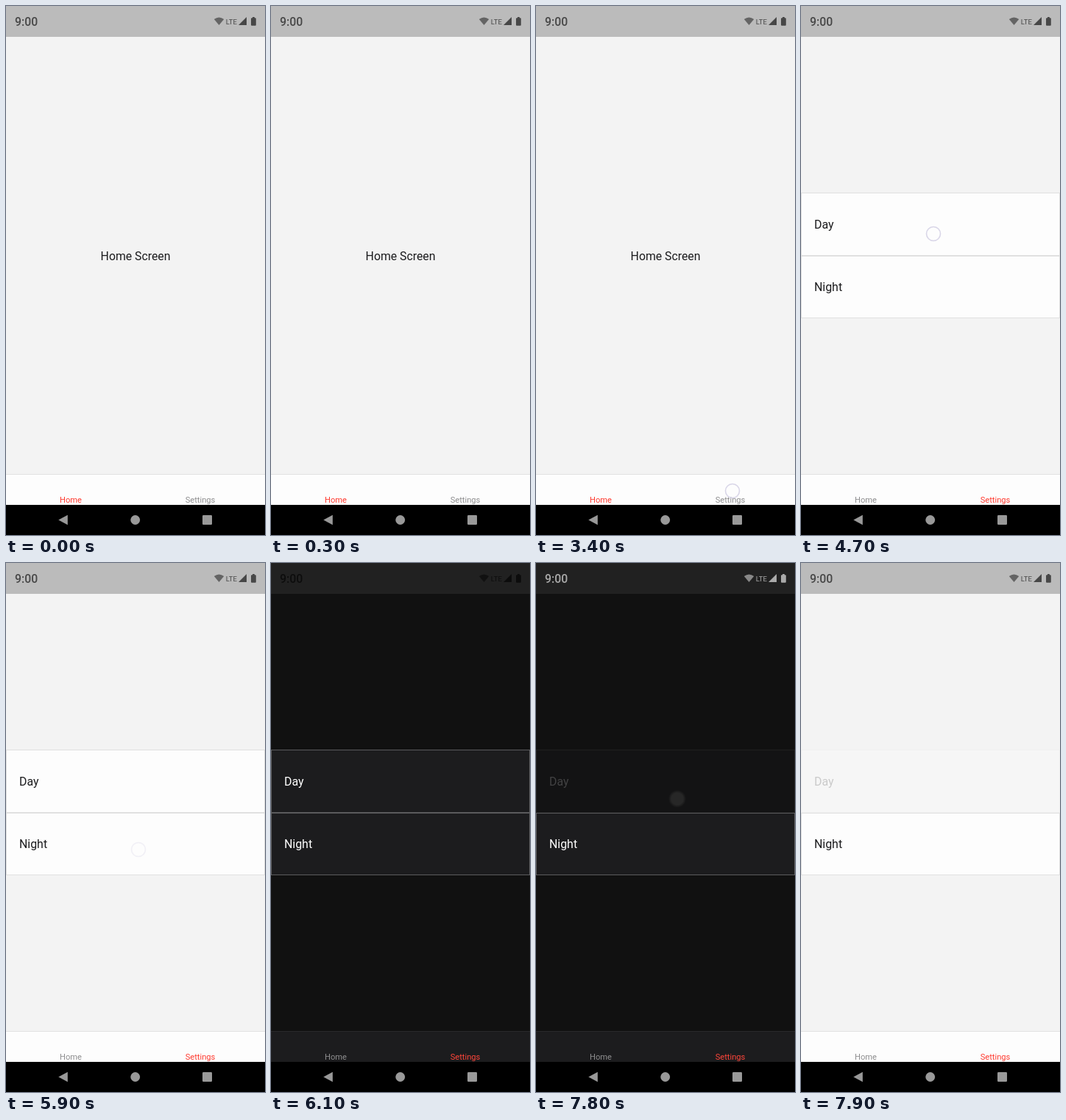
Write an HTML page with a canvas that moves like this. It is 352x720 px and loops after 8 s.

```html
<!DOCTYPE html>
<html lang="en">
<head>
<meta charset="utf-8">
<title>Day and night settings</title>
<style>
  html, body { margin: 0; width: 100%; height: 100%; overflow: hidden; background: #000; }
  canvas { display: block; width: 352px; height: 720px; }
</style>
</head>
<body>
<canvas id="stage" width="352" height="720"></canvas>
<script>
const ctx = document.getElementById('stage').getContext('2d');
const LOOP = 8000;
const STEP = 100;

const LIGHT = {
  bar: '#bbbbbb', bg: '#f3f3f3', card: '#fdfdfd', border: '#e0e0e0', tabLine: '#e2e2e2',
  text: '#1c1c1e', active: '#ff3b30', idle: '#8e8e8f'
};
const DARK = {
  bar: '#212121', bg: '#111111', card: '#1c1c1e', border: '#5b5b5d', tabLine: '#29292b',
  text: '#ffffff', active: '#ff453a', idle: '#8e8e8f'
};

// Value of the last [time, value] key reached
function hold(keys, t) {
  let value = keys[0][1];
  for (const [time, v] of keys) if (t >= time) value = v;
  return value;
}

// Opacity of the Day button: pressed to 0.2, then eased back
const DAY_ALPHA = [[0, 1], [4800, 0.5], [4900, 0.2], [5000, 0.9], [5200, 0.94],
  [5300, 0.97], [5400, 1], [7700, 0.6], [7800, 0.2]];

const TAPS = [
  { x: 267, y: 660, keys: [[0, 0], [3400, 1], [3600, 0.5], [3700, 0]] },
  { x: 180, y: 310, keys: [[0, 0], [4700, 1], [4900, 0.4], [5000, 0]] },
  { x: 180, y: 390, keys: [[0, 0], [5600, 1], [5800, 0.65], [5900, 0.35], [6100, 0]] },
  { x: 192, y: 321, keys: [[0, 0], [7400, 1], [7900, 0]] }
];

function rect(x, y, w, h, color) {
  ctx.fillStyle = color;
  ctx.fillRect(x, y, w, h);
}

function fillPath(color, alpha, trace) {
  ctx.save();
  ctx.globalAlpha *= alpha;
  ctx.fillStyle = color;
  ctx.beginPath();
  trace();
  ctx.fill();
  ctx.restore();
}

function polygon(...points) {
  points.forEach(([x, y], i) => i ? ctx.lineTo(x, y) : ctx.moveTo(x, y));
  ctx.closePath();
}

function label(text, x, y, size, color, align = 'left', weight = 400) {
  ctx.font = `${weight} ${size}px Roboto, sans-serif`;
  ctx.textAlign = align;
  ctx.fillStyle = color;
  ctx.fillText(text, x, y);
}

function statusBar(theme, ink) {
  rect(0, 0, 352, 42, theme.bar);
  ctx.save();
  ctx.globalAlpha = 0.62;
  label('9:00', 12, 27, 15.8, ink, 'left', 500);
  label('LTE', 298.8, 24.5, 9.6, ink);
  fillPath(ink, 0.75, () => {
    ctx.moveTo(289.5, 26);
    ctx.lineTo(282.8, 18);
    ctx.quadraticCurveTo(289.5, 13, 296.2, 18);
    ctx.closePath();
  });
  fillPath(ink, 1, () => polygon([327, 15], [327, 26], [316, 26]));
  fillPath(ink, 1, () => {
    ctx.roundRect(333, 16.2, 6.8, 10.6, 1);
    ctx.rect(335, 15, 2.8, 1.2);
  });
  ctx.restore();
}

function button(text, y, h, theme, alpha) {
  ctx.save();
  ctx.globalAlpha = alpha;
  rect(0, y, 352, h, theme.border);
  ctx.restore();
  // The face is mixed with the page, so that the border does not show through
  rect(1, y + 1, 350, h - 2, theme.bg);
  ctx.save();
  ctx.globalAlpha = alpha;
  rect(1, y + 1, 350, h - 2, theme.card);
  label(text, 18, y + (h > 85 ? 49 : 48), 15.9, theme.text);
  ctx.restore();
}

function tabBar(theme, settings) {
  rect(0, 637, 352, 42, theme.card);
  rect(0, 637, 352, 1, theme.tabLine);
  label('Home', 88, 676.3, 11.15, settings ? theme.idle : theme.active, 'center');
  label('Settings', 264, 676.3, 11.15, settings ? theme.active : theme.idle, 'center');
}

function navBar() {
  const grey = '#999999';
  rect(0, 679, 352, 41, '#000');
  fillPath(grey, 1, () => polygon([71.3, 699.5], [83.8, 692.7], [83.8, 706.3]));
  fillPath(grey, 1, () => ctx.arc(175.7, 699.5, 6.4, 0, 7));
  fillPath(grey, 1, () => ctx.roundRect(267, 693, 13, 13, 1.2));
}

function tapMark({ x, y, keys }, t, dark) {
  const alpha = hold(keys, t);
  if (!alpha) return;
  if (dark) {
    const glow = ctx.createRadialGradient(x, y, 8, x, y, 12);
    glow.addColorStop(0, '#272727');
    glow.addColorStop(1, 'rgba(39,39,39,0)');
    fillPath(glow, alpha, () => ctx.arc(x, y, 12, 0, 7));
    return;
  }
  ctx.save();
  ctx.globalAlpha = alpha;
  ctx.strokeStyle = '#d9d6e8';
  ctx.lineWidth = 1.6;
  ctx.beginPath();
  ctx.arc(x, y, 9.5, 0, 7);
  ctx.stroke();
  ctx.restore();
}

function draw(ms) {
  const t = Math.floor(ms % LOOP / STEP) * STEP;
  const dark = t >= 6100 && t < 7900;
  const settings = t >= 3900;
  const theme = dark ? DARK : LIGHT;

  rect(0, 0, 352, 720, theme.bg);
  statusBar(theme, dark && t >= 6200 ? '#fff' : '#000');
  if (settings) {
    button('Day', 254, 86, theme, hold(DAY_ALPHA, t));
    button('Night', 340, 85, theme, 1);
  } else {
    label('Home Screen', 176, 346, 15.8, theme.text, 'center');
  }
  tabBar(theme, settings);
  TAPS.forEach(tap => tapMark(tap, t, dark));
  navBar();
}

const start = performance.now();
function tick() {
  draw(performance.now() - start);
  requestAnimationFrame(tick);
}
tick();
</script>
</body>
</html>
```
